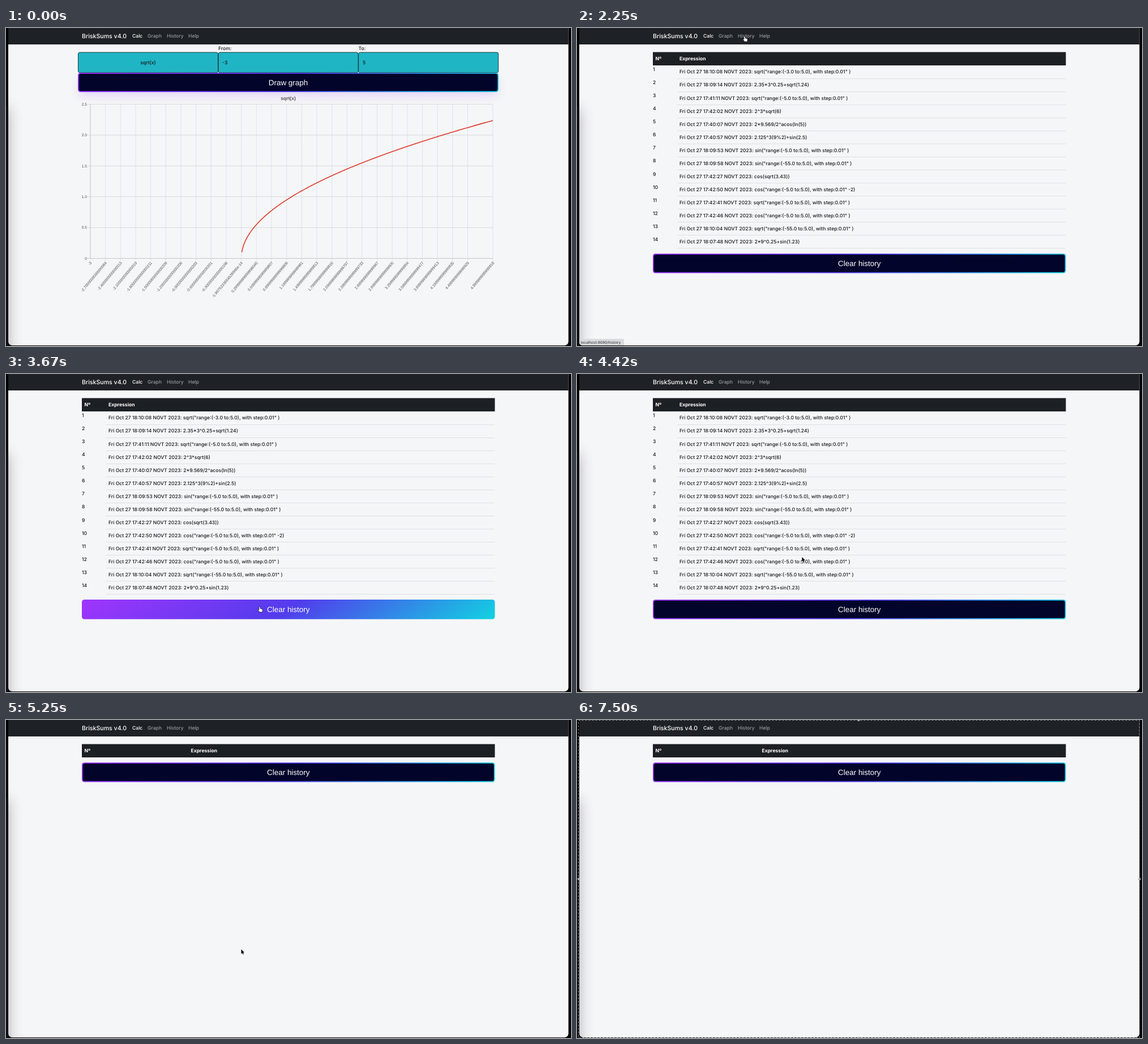
These frames come from a looping animation (998 px wide and 561 px high, 7.58 s). An HTML page with a canvas:

```html
<!DOCTYPE html>
<html lang="en">
<head>
<meta charset="utf-8">
<title>Calculator history</title>
<style>
html, body { margin: 0; width: 100%; height: 100%; overflow: hidden; background: #000; }
canvas { display: block; }
</style>
</head>
<body>
<canvas id="stage" width="998" height="561"></canvas>
<script>
const ctx = document.getElementById('stage').getContext('2d');
const LOOP = 7580, STEP = LOOP / 91;
const UI = 'Inter, "Open Sans", sans-serif';
const ARIAL = '"Liberation Sans", Arial, sans-serif';
const PAPER = '#f5f6f7', INK = '#15181b';

// When each part of the page changes, in ms
const HISTORY_AT = 1900, CLEARED_AT = 4980, FRAME_AT = 7300;
const LINK_HOVER = [1480, 2880];
const BUTTON_HOVERS = [[3230, 3960], [4640, CLEARED_AT]];
const FADE = 250;

// Pointer path: time, x, y
const POINTER = [
  [1080, 330, -14], [1400, 296, 12], [1700, 296, 15], [2800, 296, 15],
  [3300, 448, 411], [3900, 448, 411], [4330, 397.5, 323], [4500, 397.5, 323],
  [4800, 415.5, 404.5], [5700, 415.5, 404.5], [6600, 500, -14]
];

const EXPRESSIONS = [
  '18:10:08|sqrt("range:(-3.0 to:5.0), with step:0.01" )',
  '18:09:14|2.35*3^0.25+sqrt(1.24)',
  '17:41:11|sqrt("range:(-5.0 to:5.0), with step:0.01" )',
  '17:42:02|2^3*sqrt(6)',
  '17:40:07|2*9.569/2^acos(ln(5))',
  '17:40:57|2.125^3(9%2)+sin(2.5)',
  '18:09:53|sin("range:(-5.0 to:5.0), with step:0.01" )',
  '18:09:58|sin("range:(-55.0 to:5.0), with step:0.01" )',
  '17:42:27|cos(sqrt(3.43))',
  '17:42:50|cos("range:(-5.0 to:5.0), with step:0.01" -2)',
  '17:42:41|sqrt("range:(-5.0 to:5.0), with step:0.01" )',
  '17:42:46|cos("range:(-5.0 to:5.0), with step:0.01" )',
  '18:10:04|sqrt("range:(-55.0 to:5.0), with step:0.01" )',
  '18:07:48|2*9^0.25+sin(1.23)'
].map(row => {
  const [time, body] = row.split('|');
  return `Fri Oct 27 ${time} NOVT 2023: ${body}`;
});

// Samples are summed step by step, so the labels keep their rounding errors
const samples = [];
for (let i = 0, x = -3; i <= 800; i++, x += 0.01) samples.push(x);

const clamp = v => Math.max(0, Math.min(1, v));
const inside = (t, [from, to]) => t >= from && t < to;

function text(str, x, y, { size = 8.6, font = UI, color = INK, align = 'left', weight = 500 } = {}) {
  ctx.font = `${weight} ${size}px ${font}`;
  ctx.textRendering = 'geometricPrecision';
  ctx.fillStyle = color;
  ctx.textAlign = align;
  ctx.textBaseline = 'alphabetic';
  ctx.fillText(str, x, y);
}

function line(x1, y1, x2, y2, color, width = 1) {
  ctx.strokeStyle = color;
  ctx.lineWidth = width;
  ctx.beginPath();
  ctx.moveTo(x1, y1);
  ctx.lineTo(x2, y2);
  ctx.stroke();
}

function box(x, y, w, h, r, fill) {
  ctx.beginPath();
  ctx.roundRect(x, y, w, h, r);
  ctx.fillStyle = fill;
  ctx.fill();
}

function slantedGradient(x, y, w, h) {
  const a = 144 * Math.PI / 180, dx = Math.sin(a), dy = -Math.cos(a);
  const half = (w * dx + h * dy) / 2, cx = x + w / 2, cy = y + h / 2;
  const g = ctx.createLinearGradient(cx - dx * half, cy - dy * half, cx + dx * half, cy + dy * half);
  g.addColorStop(0, '#a035fc');
  g.addColorStop(0.5, '#523cec');
  g.addColorStop(1, '#12d2e2');
  return g;
}

function button(label, x, y, w, h, hover = 0) {
  box(x, y, w, h, 4.5, slantedGradient(x, y, w, h));
  ctx.globalAlpha = 1 - hover;
  box(x + 1.7, y + 1.7, w - 3.4, h - 3.4, 3.4, '#03042a');
  ctx.globalAlpha = 1;
  text(label, x + w / 2, y + h / 2 + 4.8, { size: 13.45, font: ARIAL, color: '#fff', align: 'center', weight: 400 });
}

function drawWindow() {
  ctx.fillStyle = '#000';
  ctx.fillRect(0, 0, 998, 561);
  ctx.fillStyle = '#27303c';
  ctx.fillRect(1.5, 138, 1, 423);

  box(4, 0, 989.5, 560, [0, 0, 7, 7], PAPER);
  ctx.save();
  ctx.clip();
  ctx.shadowColor = 'rgba(80,65,75,.45)';
  ctx.shadowBlur = 26;
  ctx.fillStyle = '#000';
  ctx.fillRect(-40, 142, 43, 480);
  ctx.restore();

  ctx.fillStyle = '#1e2226';
  ctx.fillRect(4, 0, 989.5, 29);
  text('BriskSums v4.0', 134, 17.8, { size: 10.6, color: '#fff' });
  const links = [['Calc', 223], ['Graph', 250], ['History', 284], ['Help', 322]];
  links.forEach(([name, x], i) =>
    text(name, x, 17, { color: i ? 'rgba(255,255,255,.55)' : '#fff' }));
}

function drawChart() {
  const left = 149, right = 860, top = 134.5, bottom = 406.5;
  const px = i => left + (right - left) * i / 800;
  const py = v => bottom - (bottom - top) * v / 2.5;
  const label = { size: 6.7, font: ARIAL, color: '#4c4c4c', align: 'right', weight: 400 };

  text('sqrt(x)', 498.5, 126.5, { font: ARIAL, color: '#555', align: 'center', weight: 700 });

  ctx.save();
  ctx.beginPath();
  ctx.rect(134, 110, 740, 400);
  ctx.clip();
  const ticks = [...Array(26).keys()].map(k => k * 30).concat(800);
  for (const i of ticks) {
    const x = px(i);
    line(x, top, x, bottom + 5, '#dfe2ec');
    ctx.save();
    ctx.translate(x + 1, bottom + 6.5);
    ctx.rotate(-50 * Math.PI / 180);
    text(String(samples[i]), 0, 2.4, label);
    ctx.restore();
  }
  for (let k = 0; k <= 5; k++) {
    const v = k / 2, y = py(v);
    line(left - 5, y, right, y, k ? '#d8d9dd' : '#c8c6bd');
    text(k ? v.toFixed(1) : '0', 143, y + 2.3, label);
  }
  line(left, top, left, bottom, '#cdcbc4');
  ctx.restore();

  ctx.beginPath();
  samples.forEach((x, i) => { if (x >= 0) ctx.lineTo(px(i), py(Math.sqrt(x))); });
  ctx.strokeStyle = '#dd3a30';
  ctx.lineWidth = 1.6;
  ctx.lineJoin = 'round';
  ctx.stroke();
}

function drawGraphPage() {
  text('From:', 375, 39.3);
  text('To:', 622.5, 39.3);
  for (let i = 0; i < 3; i++) {
    box(127.5 + i * 247.6, 43, 247, 35.8, 3, '#20b5c4');
    ctx.strokeStyle = '#17373f';
    ctx.lineWidth = 1;
    ctx.stroke();
  }
  text('sqrt(x)', 251, 64.2, { align: 'center' });
  text('-3', 382, 64.2);
  text('5', 630, 64.2);

  ctx.save();
  ctx.shadowColor = 'rgba(151,65,252,.2)';
  ctx.shadowBlur = 17;
  ctx.shadowOffsetY = 8.4;
  box(129.8, 82, 737.4, 28.4, 3, '#03042a');
  ctx.restore();
  button('Draw graph', 127, 79, 743, 34);
  drawChart();
}

function drawHistoryPage(cleared, hover) {
  ctx.fillStyle = '#1c2024';
  ctx.fillRect(134, 42.5, 729.5, 23.5);
  const head = { color: '#fff', weight: 700 };
  text('Nº', 138.5, 57.3, head);
  text('Expression', cleared ? 326.5 : 181, 57.3, head);
  if (!cleared) {
    EXPRESSIONS.forEach((row, i) => {
      const y = 66 + i * 23.07;
      text(String(i + 1), 134, y + 10);
      text(row, 181, y + 14.4);
      const edge = Math.round(y + 22.5) + 0.5;
      line(176.5, edge, 863.5, edge, '#dee0e6');
    });
  }
  button('Clear history', 134, cleared ? 75 : 398, 729.5, 34.5, hover);
}

function drawStatus() {
  box(4, 548.5, 79, 11.5, [0, 2, 0, 5], '#d9dadd');
  text('localhost:8080/history', 6.5, 557, { size: 6.5, color: '#45484c' });
}

function shape(points, fill, stroke) {
  ctx.beginPath();
  points.forEach(([x, y]) => ctx.lineTo(x, y));
  ctx.closePath();
  ctx.lineJoin = 'round';
  ctx.lineWidth = 1.2;
  ctx.strokeStyle = stroke;
  ctx.stroke();
  ctx.fillStyle = fill;
  ctx.fill();
}

const ARROW = [[0, 0], [0, 8], [1.8, 6.4], [3.1, 9.3], [4.4, 8.7], [3.1, 5.9], [5.6, 5.8]];
const HAND = [[-.8, 0], [.6, 0], [.9, 3], [4.6, 3.9], [5, 5.2], [4.3, 8.8], [.4, 8.8], [-2.4, 5.4], [-1.7, 4.6], [-.6, 5.4]];

function pointerAt(t) {
  const k = POINTER.findIndex(p => p[0] > t);
  if (k < 1) return null;
  const [t0, x0, y0] = POINTER[k - 1], [t1, x1, y1] = POINTER[k];
  const u = (t - t0) / (t1 - t0), e = u * u * (3 - 2 * u);
  return [x0 + (x1 - x0) * e, y0 + (y1 - y0) * e];
}

function drawPointer(t) {
  const spot = pointerAt(t);
  if (!spot) return;
  const pointing = [LINK_HOVER, ...BUTTON_HOVERS].some(span => inside(t, span));
  ctx.save();
  ctx.translate(...spot);
  if (pointing) shape(HAND, '#fff', '#111');
  else shape(ARROW, '#000', '#fff');
  ctx.restore();
}

function hoverAmount(t) {
  if (t >= CLEARED_AT) return 0;
  return Math.max(...BUTTON_HOVERS.map(([from, to]) =>
    Math.min(clamp((t - from) / FADE), 1 - clamp((t - to) / FADE))));
}

function drawCaptureFrame() {
  ctx.save();
  ctx.setLineDash([3, 3]);
  ctx.strokeStyle = '#8c9096';
  ctx.lineWidth = 1;
  ctx.strokeRect(2.5, 0.5, 991, 560);
  ctx.restore();
  for (const [x, y] of [[497.5, 0], [3, 280.5], [993.5, 280.5], [497.5, 561]]) {
    ctx.beginPath();
    ctx.arc(x, y, 2.2, 0, 2 * Math.PI);
    ctx.fillStyle = '#a9acb0';
    ctx.fill();
  }
}

function render(t) {
  drawWindow();
  if (t < HISTORY_AT) drawGraphPage();
  else drawHistoryPage(t >= CLEARED_AT, hoverAmount(t));
  if (inside(t, LINK_HOVER)) drawStatus();
  drawPointer(t);
  if (t >= FRAME_AT) drawCaptureFrame();
}

const start = performance.now();
function tick() {
  const t = (performance.now() - start) % LOOP;
  render(Math.floor((t + 4) / STEP) % 91 * STEP);
  requestAnimationFrame(tick);
}
tick();
</script>
</body>
</html>
```
